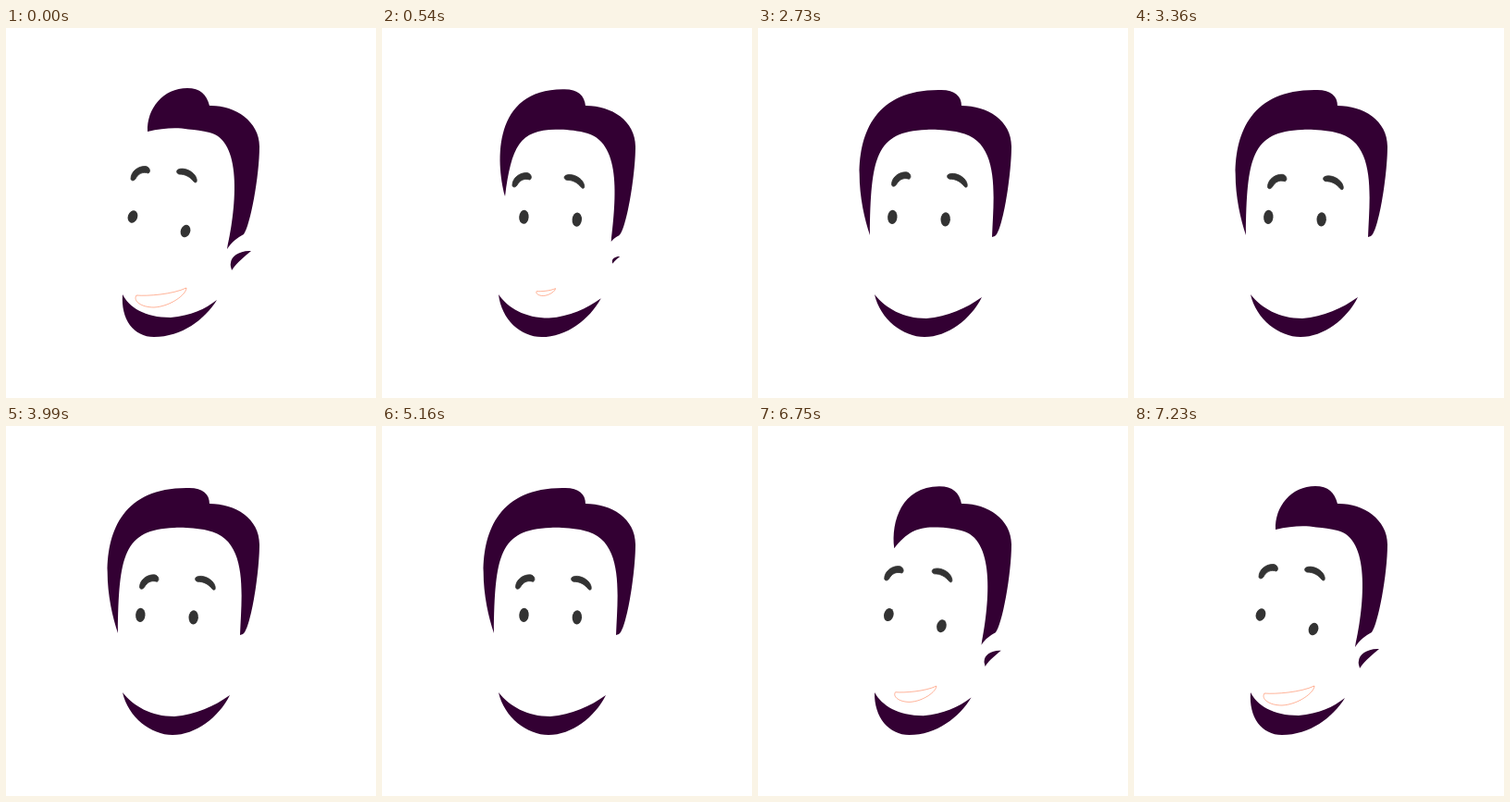
Animation, 400 px wide and 400 px high, one loop 9870 ms. Source, as an HTML page:

```html
<!DOCTYPE html>
<html lang="en">
<head>
<meta charset="utf-8">
<title>Turning face</title>
<style>
html, body { margin: 0; width: 100%; height: 100%; overflow: hidden; background: #fff; }
svg { display: block; width: 100vw; height: 100vh; }
.hair { fill: #303; }
.ink { fill: #333; }
path.ink { stroke: #333; stroke-width: .8; }
#mouth { fill: #fff; stroke: #f63; stroke-width: .5; vector-effect: non-scaling-stroke; }
</style>
</head>
<body>
<svg viewBox="0 0 400 400">
  <path id="hair" class="hair"/>
  <path id="beard" class="hair"/>
  <path id="ear" class="hair" d="M265 241C253 240 243 247 243 254C242 257 244 260 244 262C250 253 258 247 265 241Z"/>
  <path id="mouth" d="M141 289C153 290 180 288 195 281C195 288 178 301 160 302C146 302 137 295 141 289Z"/>
  <path id="browL" class="ink" d="M135 163C135 155 143 149 151 149.5C155 150 157 155 154 157C147 155 143 158 140 163C138 166 135 165 135 163Z"/>
  <path id="browR" class="ink" d="M186 153C192 150 204 155 206 163C207 167 205 168 203 166C199 161 194 158 187 158C184 157 184 154 186 153Z"/>
  <ellipse id="eyeL" class="ink"/>
  <ellipse id="eyeR" class="ink"/>
</svg>
<script>
const LOOP = 9870, STEP = 30;
const $ = id => document.getElementById(id);

// Each pair holds the side view and the front view.
const hair = [
  'M153 112C152 87 170 65 196 65C210 65 217 72 220 84C246 83 274 100 274 128C274 160 264 214 257 223C250 227 244 231 239 239C250 190 255 121 220 113C212 111 205 110 197 109.5C185 107.5 170 108 153 112Z',
  'M121 224C105 178 90 67 195 67C212 66 220 73 220 84C248 84 274 100 274 128C274 160 264 222 256 225C255 225 254 226 253 226C255 180 262 122 218 113C205 110 190 109.5 182 110C127 112 122 140 121 224Z'
];
const beard = [
  'M126 288C133 302 150 313 178 313C200 311 215 304 228 294C215 315 190 334 160 334C138 334 124 315 126 288Z',
  'M126 288C138 303 157 314 182 314C205 312 225 303 242 291C230 315 205 334 180 334C157 334 132 315 126 288Z'
];

const mix = (a, b, k) => a + (b - a) * k;
const span = (t, start, length) => Math.min(1, Math.max(0, (t - start) / length));
const ease = p => p < .5 ? 4 * p ** 3 : 1 - 4 * (1 - p) ** 3;
const move = (t, start, length) => ease(span(t, start, length));

function morph([a, b], k) {
  const ends = b.match(/[\d.]+/g);
  let i = 0;
  return a.replace(/[\d.]+/g, n => mix(+n, +ends[i++], k).toFixed(2));
}

function shrink(id, x, y, k) {
  $(id).setAttribute('transform', `translate(${x} ${y}) scale(${k}) translate(${-x} ${-y})`);
  $(id).style.display = k < .02 ? 'none' : '';
}

function shift(id, x, y) {
  $(id).setAttribute('transform', `translate(${x} ${y})`);
}

function eye(id, [x0, y0], [x1, y1], k, look) {
  const el = $(id);
  el.setAttribute('rx', 5.2);
  el.setAttribute('ry', mix(6.9, 7.6, k));
  el.setAttribute('transform',
    `translate(${mix(x0, x1, k) - 8.5 * look} ${mix(y0, y1, k)}) rotate(${mix(20, 4, k)})`);
}

function draw(t) {
  const back = move(t, 5880, 1350);
  const front = move(t, 0, 990) - back;
  const eyes = move(t, 0, 660) - move(t, 6030, 1200);
  const look = move(t, 960, 420) - move(t, 4830, 420);

  // Three brow raises, 420 ms up and 420 ms down.
  const beat = span(t, 2310, 2520) * 6 % 2;
  const raise = 5 * ease(beat < 1 ? beat : 2 - beat);

  $('hair').setAttribute('d', morph(hair, front));
  $('beard').setAttribute('d', morph(beard, front));
  shrink('ear', 252.5, 250.5, 1 - front);
  shrink('mouth', 183, 282, 1 - front);
  shift('browL', 9.5 * front, 11.3 * front - raise);
  shift('browR', 20 * front, 10.2 * front - raise);
  eye('eyeL', [137, 204], [153.8, 204.3], eyes, look);
  eye('eyeR', [194, 219.5], [211.2, 206.8], eyes, look);
}

const start = performance.now();
function tick() {
  const t = (performance.now() - start) % LOOP;
  draw(Math.floor(t / STEP) * STEP);
  requestAnimationFrame(tick);
}
tick();
</script>
</body>
</html>
```
